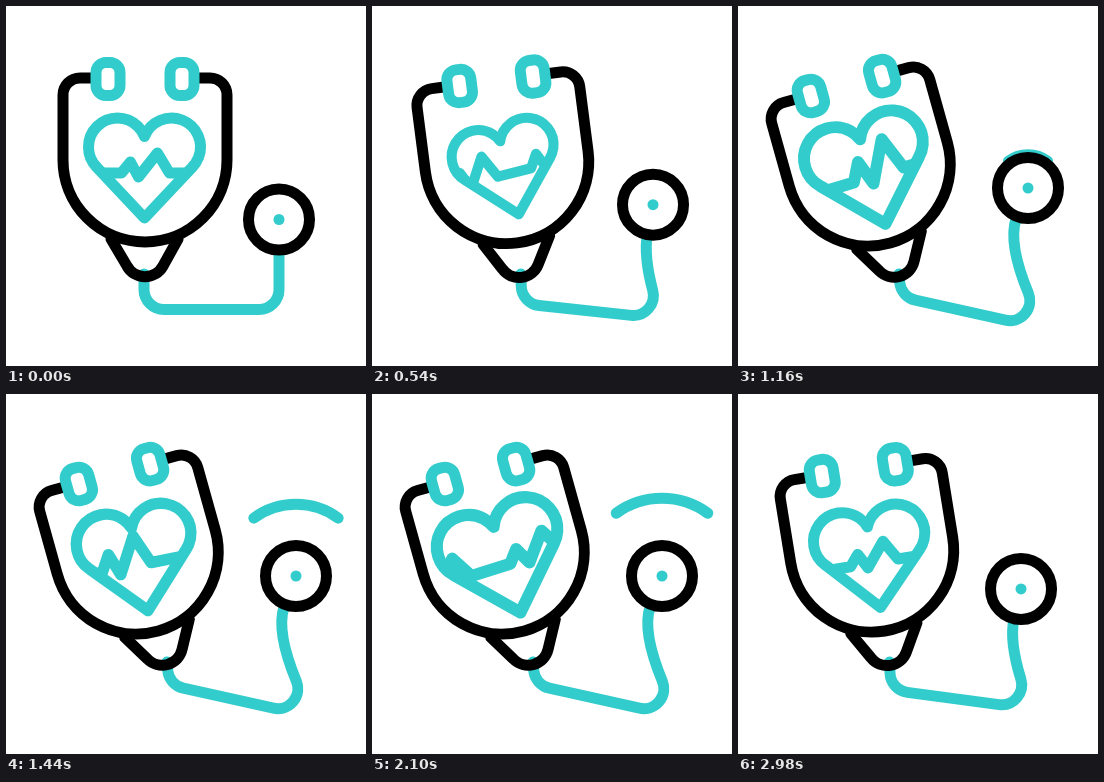
Recreate the animation shown at these times as an HTML page with a canvas. Size 360 px wide and 360 px high, loop 3 s.

```html
<!DOCTYPE html>
<html>
<head>
<meta charset="utf-8">
<style>
html, body { margin: 0; width: 100%; height: 100%; overflow: hidden; background: #fff; }
canvas { display: block; }
</style>
</head>
<body>
<canvas width="360" height="360"></canvas>
<script>
const c = document.querySelector('canvas').getContext('2d');
const TEAL = '#33cccc', BLACK = '#000', LOOP = 3000, BEAT_GAP = 85;

const frame = new Path2D('M90 72H74A17 17 0 0 0 57 89V154A82 82 0 0 0 221 154V89A17 17 0 0 0 204 72H188');
const cup = new Path2D('M105 233L121 260A20.500 20.500 0 0 0 157 260L172 233');
const heart = new Path2D();
heart.moveTo(0, 51);
heart.arc(-27, -20, 29, .75 * Math.PI, -.374);
heart.arc(27, -20, 29, Math.PI + .374, .25 * Math.PI);
heart.closePath();

const mix = (a, b, u) => a + (b - a) * u;

// Smooth step from 0 to 1, beginning at start
function ease(t, start, length) {
  const u = Math.min(1, Math.max(0, (t - start) / length));
  return u * u * (3 - 2 * u);
}

// Eases through evenly spaced values over one loop
function along(values, t) {
  const step = LOOP / (values.length - 1), i = Math.floor(t / step);
  return mix(values[i], values[i + 1], ease(t, i * step, step));
}

function stroke(path, color, fill) {
  if (fill) {
    c.fillStyle = '#fff';
    c.fill(path);
  }
  c.strokeStyle = color;
  c.stroke(path);
}

function circle(x, y, r, from = 0, to = 2 * Math.PI) {
  const p = new Path2D();
  p.arc(x, y, r, from, to);
  return p;
}

function drawTube(tilt) {
  const point = (x0, y0, x1, y1) => [mix(x0, x1, tilt), mix(y0, y1, tilt)];
  const left = point(138, 303.5, 163, 291), right = point(273, 303.5, 305, 322.5);
  const knee = point(273, 260, 270, 238);
  const path = new Path2D();
  path.moveTo(...point(138, 268, 161, 268));
  path.arcTo(...left, ...right, 20);
  path.arcTo(...right, ...knee, 20);
  path.quadraticCurveTo(...knee, ...point(273, 243, 278, 213));
  stroke(path, TEAL);
}

function drawChestPiece(t, tilt) {
  const x = mix(273, 290, tilt), y = mix(213.5, 182, tilt), up = -Math.PI / 2;
  const r = 30 + 64 * ease(t, 1080, 600) - 27 * ease(t, 1680, 740)
    + 24 * ease(t, 2420, 180) - 61 * ease(t, 2600, 380);
  if (r > 30) stroke(circle(x, y, r, up - .63, up + .63), TEAL);
  stroke(circle(x, y, 30.5), BLACK, true);
  c.fillStyle = TEAL;
  c.fill(circle(x, y, 5.5));
}

// The pulse scrolls left, slows in the last second and swells early on
function pulseLine(t) {
  const sec = t / 1000, shift = 68 * sec - 34 * Math.max(0, sec - 2) ** 2;
  const swell = 1 + .55 * Math.sin(Math.PI * Math.min(1, sec / 2.2)) ** 2;
  const path = new Path2D();
  for (let k = -1; k < 4; k++) {
    for (const [x, y] of [[-23, 0], [-14, -11], [-6, 4], [13, -20], [25, 0]]) {
      path.lineTo(x + k * BEAT_GAP - shift, 6 + y * swell);
    }
  }
  return path;
}

function drawHeart(t) {
  c.translate(138.5, 161);
  c.rotate(along([0, -8.5, 4.5, -2.5, 0], t) * Math.PI / 180);
  const s = along([1, .92, 1.1, 1.03, 1.11, 1.02, 1], t);
  c.scale(s, s);
  c.save();
  c.clip(heart);
  stroke(pulseLine(t), TEAL);
  c.restore();
  stroke(heart, TEAL);
}

function drawBody(t, tilt) {
  c.save();
  c.translate(149.5, 188);
  c.rotate(-15.6 * tilt * Math.PI / 180);
  c.translate(-149.5, -188);
  stroke(cup, BLACK);
  stroke(frame, BLACK);
  for (const x of [90, 164]) {
    const tip = new Path2D();
    tip.roundRect(x, 56.5, 24, 33, 10);
    stroke(tip, TEAL, true);
  }
  drawHeart(t);
  c.restore();
}

function draw(t) {
  const tilt = ease(t, 0, 1125) - ease(t, 2585, 900);
  c.fillStyle = '#fff';
  c.fillRect(0, 0, 360, 360);
  c.lineWidth = 11;
  c.lineCap = c.lineJoin = 'round';
  drawTube(tilt);
  drawChestPiece(t, tilt);
  drawBody(t, tilt);
}

const start = performance.now();
function tick() {
  draw((performance.now() - start) % LOOP);
  requestAnimationFrame(tick);
}
tick();
</script>
</body>
</html>
```
